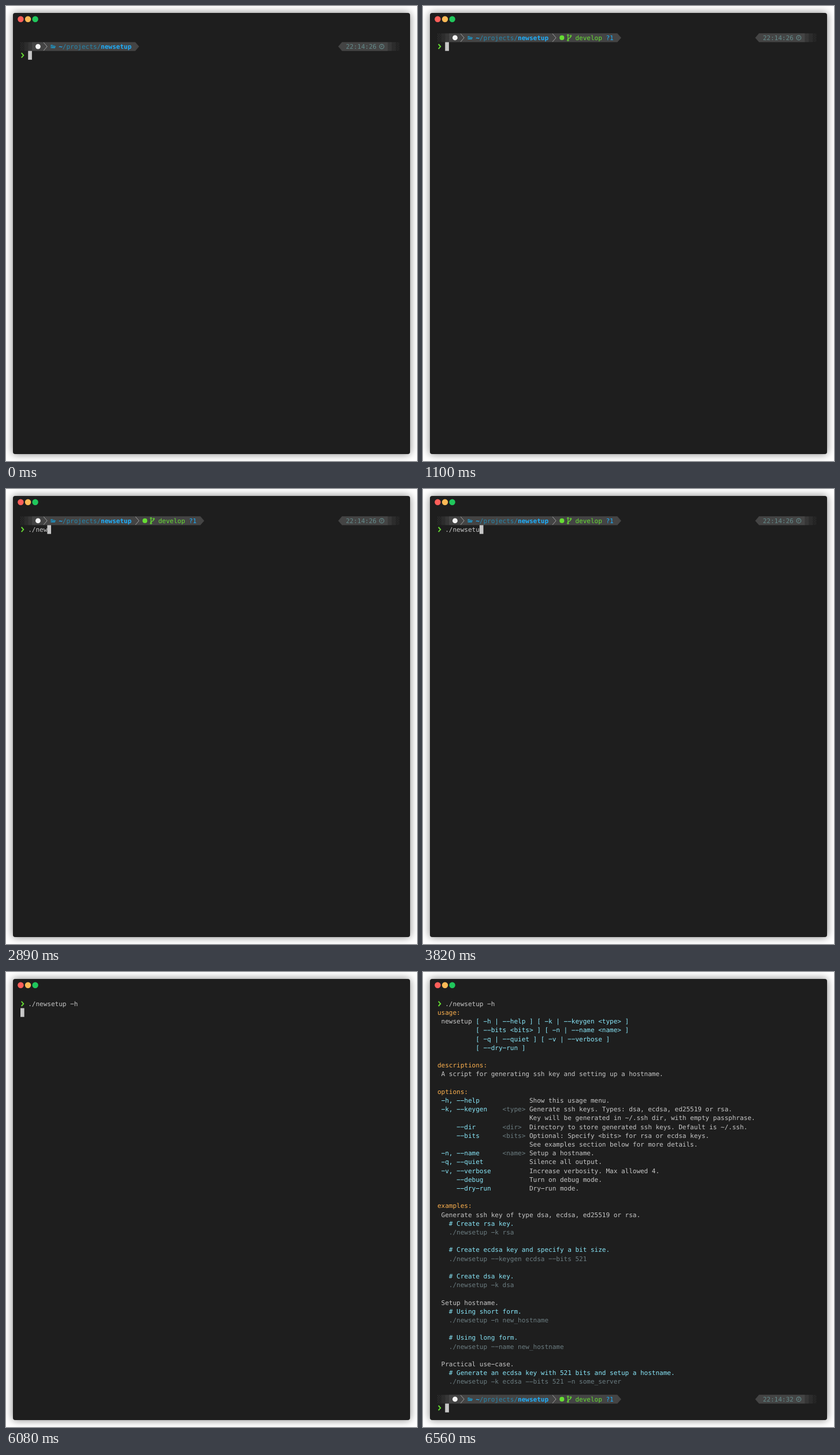
Animation of 711x787 px, one loop 8 s. Source, as an HTML page with a canvas:

```html
<!DOCTYPE html>
<html lang="en">
<head>
<meta charset="utf-8">
<title>Terminal session</title>
<style>
html, body { margin: 0; width: 100%; height: 100%; overflow: hidden; background: #fff; }
canvas { display: block; width: 711px; height: 787px; }
</style>
</head>
<body>
<canvas id="stage"></canvas>
<script>
const W = 711, H = 787, LOOP = 8000;
const X0 = 25, Y0 = 47.3, CW = 6.6226, LH = 15.2;
const FONT = '11px "DejaVu Sans Mono", monospace';
const C = {
  bg: '#1e1e1e', bar: '#444444', text: '#c7c7c7', dim: '#6b7c80',
  orange: '#fcb04e', cyan: '#88e6f8', green: '#66dd33',
  blue: '#1eaefc', path: '#2587ae', clock: '#648a8a', sep: '#a0a0a0'
};

const canvas = document.getElementById('stage');
const dpr = window.devicePixelRatio || 1;
canvas.width = W * dpr;
canvas.height = H * dpr;
const ctx = canvas.getContext('2d');
ctx.scale(dpr, dpr);
ctx.textRendering = 'geometricPrecision';

const colX = c => X0 + c * CW;
const rowY = r => Y0 + r * LH;

function poly(points, fill, stroke, width) {
  ctx.beginPath();
  points.forEach(([x, y]) => ctx.lineTo(x, y));
  if (fill) { ctx.fillStyle = fill; ctx.fill(); }
  if (stroke) { ctx.strokeStyle = stroke; ctx.lineWidth = width; ctx.stroke(); }
}

function rect(x, y, w, h, color) {
  ctx.fillStyle = color;
  ctx.fillRect(x, y, w, h);
}

function disc(x, y, r, color) {
  ctx.beginPath();
  ctx.arc(x, y, r, 0, Math.PI * 2);
  ctx.fillStyle = color;
  ctx.fill();
}

// Text on the cell grid; hyphens are drawn as wide strokes.
function put(row, col, color, str, bold) {
  ctx.font = (bold ? 'bold ' : '') + FONT;
  ctx.fillStyle = color;
  const base = rowY(row) + 11.4;
  [...str].forEach((ch, i) => {
    const x = colX(col + i);
    if (ch === '-') ctx.fillRect(x + 0.4, base - 3.9, 5.8, 0.95);
    else if (ch !== ' ') ctx.fillText(ch, x, base);
  });
}

function cursor(row, col) {
  rect(colX(col), rowY(row), CW, LH, C.text);
}

function arrow(row) {
  const y = rowY(row) + LH / 2;
  poly([[26.7, y - 4.1], [30.3, y], [26.7, y + 4.1]], null, C.green, 1.9);
}

function separator(row, col) {
  const x = colX(col), y = rowY(row);
  poly([[x + 0.3, y + 0.6], [x + 6.4, y + LH / 2], [x + 0.3, y + LH - 0.6]], null, C.sep, 1);
}

// Dotted shade cell, level 1 (light) to 3 (dark).
function shade(row, col, level) {
  const x = colX(col), y = rowY(row);
  ctx.globalAlpha = [0.1, 0.3, 0.6][level - 1];
  rect(x, y, CW, LH, C.bar);
  ctx.globalAlpha = 0.75;
  const step = CW / (level + 1);
  for (let j = 0; j < 7; j++)
    for (let i = 0; i <= level; i++)
      rect(x + (i + (j % 2) * 0.5) * step, y + 0.6 + j * 2.1, 0.9, 1, C.bar);
  ctx.globalAlpha = 1;
}

function folder(x, y, color) {
  poly([[x, y + 3], [x, y - 3], [x + 3, y - 3], [x + 3.8, y - 2], [x + 6.6, y - 2],
        [x + 6.6, y - 0.8], [x + 8.8, y - 0.8], [x + 7.2, y + 3.2]], color);
  poly([[x + 0.9, y + 1.6], [x + 2.2, y - 0.9], [x + 6.6, y - 0.9]], null, C.bar, 0.6);
}

function branch(x, y) {
  ctx.beginPath();
  ctx.moveTo(x + 1.8, y - 3.5);
  ctx.lineTo(x + 1.8, y + 4);
  ctx.moveTo(x + 6.6, y - 2.4);
  ctx.bezierCurveTo(x + 6.6, y + 1.6, x + 2.2, y, x + 1.8, y + 3);
  ctx.strokeStyle = C.green;
  ctx.lineWidth = 1.3;
  ctx.stroke();
  for (const [dx, dy] of [[1.8, -4.4], [6.6, -3.2], [1.8, 4.4]]) {
    disc(x + dx, y + dy, 1.8, C.green);
    disc(x + dx, y + dy, 0.65, C.bar);
  }
}

function clock(x, y) {
  ctx.beginPath();
  ctx.arc(x, y, 3.8, 0, Math.PI * 2);
  ctx.strokeStyle = C.clock;
  ctx.lineWidth = 1.2;
  ctx.stroke();
  poly([[x + 0.3, y - 2.3], [x + 0.3, y + 0.5], [x - 1.7, y + 0.5]], null, C.clock, 0.9);
}

function prompt(row, git, time) {
  const y = rowY(row), mid = y + LH / 2, end = git ? 47 : 30;
  for (const i of [0, 1, 2]) {
    shade(row, i, i + 1);
    shade(row, 98 - i, i + 1);
  }
  poly([[colX(3), y], [colX(end), y], [colX(end + 1), mid], [colX(end), y + LH], [colX(3), y + LH]], C.bar);
  poly([[colX(96), y], [colX(84), y], [colX(83), mid], [colX(84), y + LH], [colX(96), y + LH]], C.bar);

  disc(55.4, mid, 4.4, '#f4f4f4');
  separator(row, 6);
  folder(77.4, mid, C.path);
  put(row, 10, C.blue, '~', true);
  put(row, 11, C.path, '/projects/');
  put(row, 21, C.blue, 'newsetup', true);
  if (git) {
    separator(row, 30);
    disc(240.3, mid, 4.1, C.green);
    branch(249, mid);
    put(row, 36, C.green, 'develop');
    put(row, 44, C.blue, '?1');
  }
  put(row, 85, C.clock, time);
  clock(650, mid);
}

const OPTIONS = [
  ['-h, --help', '', 'Show this usage menu.'],
  ['-k, --keygen', '<type>', 'Generate ssh keys. Types: dsa, ecdsa, ed25519 or rsa.'],
  ['', '', 'Key will be generated in ~/.ssh dir, with empty passphrase.'],
  ['    --dir', '<dir>', 'Directory to store generated ssh keys. Default is ~/.ssh.'],
  ['    --bits', '<bits>', 'Optional: Specify <bits> for rsa or ecdsa keys.'],
  ['', '', 'See examples section below for more details.'],
  ['-n, --name', '<name>', 'Setup a hostname.'],
  ['-q, --quiet', '', 'Silence all output.'],
  ['-v, --verbose', '', 'Increase verbosity. Max allowed 4.'],
  ['    --debug', '', 'Turn on debug mode.'],
  ['    --dry-run', '', 'Dry-run mode.']
];

const EXAMPLES = [
  [25, 'Create rsa key.', '-k rsa'],
  [28, 'Create ecdsa key and specify a bit size.', '--keygen ecdsa --bits 521'],
  [31, 'Create dsa key.', '-k dsa'],
  [35, 'Using short form.', '-n new_hostname'],
  [38, 'Using long form.', '--name new_hostname'],
  [42, 'Generate an ecdsa key with 521 bits and setup a hostname.', '-k ecdsa --bits 521 -n some_server']
];

function help() {
  put(1, 0, C.orange, 'usage:');
  put(2, 1, C.text, 'newsetup');
  ['[ -h | --help ] [ -k | --keygen <type> ]',
   '[ --bits <bits> ] [ -n | --name <name> ]',
   '[ -q | --quiet ] [ -v | --verbose ]',
   '[ --dry-run ]'].forEach((line, i) => put(2 + i, 10, C.cyan, line));
  put(7, 0, C.orange, 'descriptions:');
  put(8, 1, C.text, 'A script for generating ssh key and setting up a hostname.');
  put(10, 0, C.orange, 'options:');
  OPTIONS.forEach(([flag, arg, about], i) => {
    put(11 + i, 1, C.cyan, flag);
    put(11 + i, 17, C.dim, arg);
    put(11 + i, 24, C.text, about);
  });
  put(23, 0, C.orange, 'examples:');
  put(24, 1, C.text, 'Generate ssh key of type dsa, ecdsa, ed25519 or rsa.');
  put(34, 1, C.text, 'Setup hostname.');
  put(41, 1, C.text, 'Practical use-case.');
  for (const [row, note, args] of EXAMPLES) {
    put(row, 3, C.cyan, '# ' + note);
    put(row + 1, 3, C.dim, './newsetup ' + args);
  }
}

function frame() {
  rect(0, 0, W, H, '#fff');
  ctx.save();
  ctx.shadowColor = 'rgba(0,0,0,0.5)';
  ctx.shadowBlur = 14 * dpr;
  ctx.fillStyle = C.bg;
  ctx.beginPath();
  ctx.roundRect(12, 12, 687, 763, 4);
  ctx.fill();
  ctx.restore();
  ['#ff5f5a', '#fcb956', '#20c75c'].forEach((c, i) => disc(25.4 + i * 12.6, 22.8, 5.2, c));
}

const COMMAND = './newsetup -h';
const KEYS = [1960, 2150, 2550, 2770, 2890, 3070, 3240, 3420, 3820, 4090, 4260, 4770, 5380];

function draw(t) {
  frame();
  if (t < 1100) {
    prompt(1, t >= 190, '22:14:26');
    arrow(2);
    if (t < 1000) cursor(2, 2);
  } else if (t < 6080) {
    const typed = KEYS.filter(k => t >= k).length;
    prompt(0, true, '22:14:26');
    arrow(1);
    put(1, 2, C.text, COMMAND.slice(0, typed));
    cursor(1, 2 + typed);
  } else {
    arrow(0);
    put(0, 2, C.text, COMMAND);
    if (t < 6460) {
      cursor(1, 0);
      return;
    }
    help();
    if (t < 6560) return;
    prompt(45, true, '22:14:32');
    arrow(46);
    cursor(46, 2);
  }
}

const start = performance.now();
function tick() {
  draw((performance.now() - start) % LOOP);
  requestAnimationFrame(tick);
}
tick();
</script>
</body>
</html>
```
